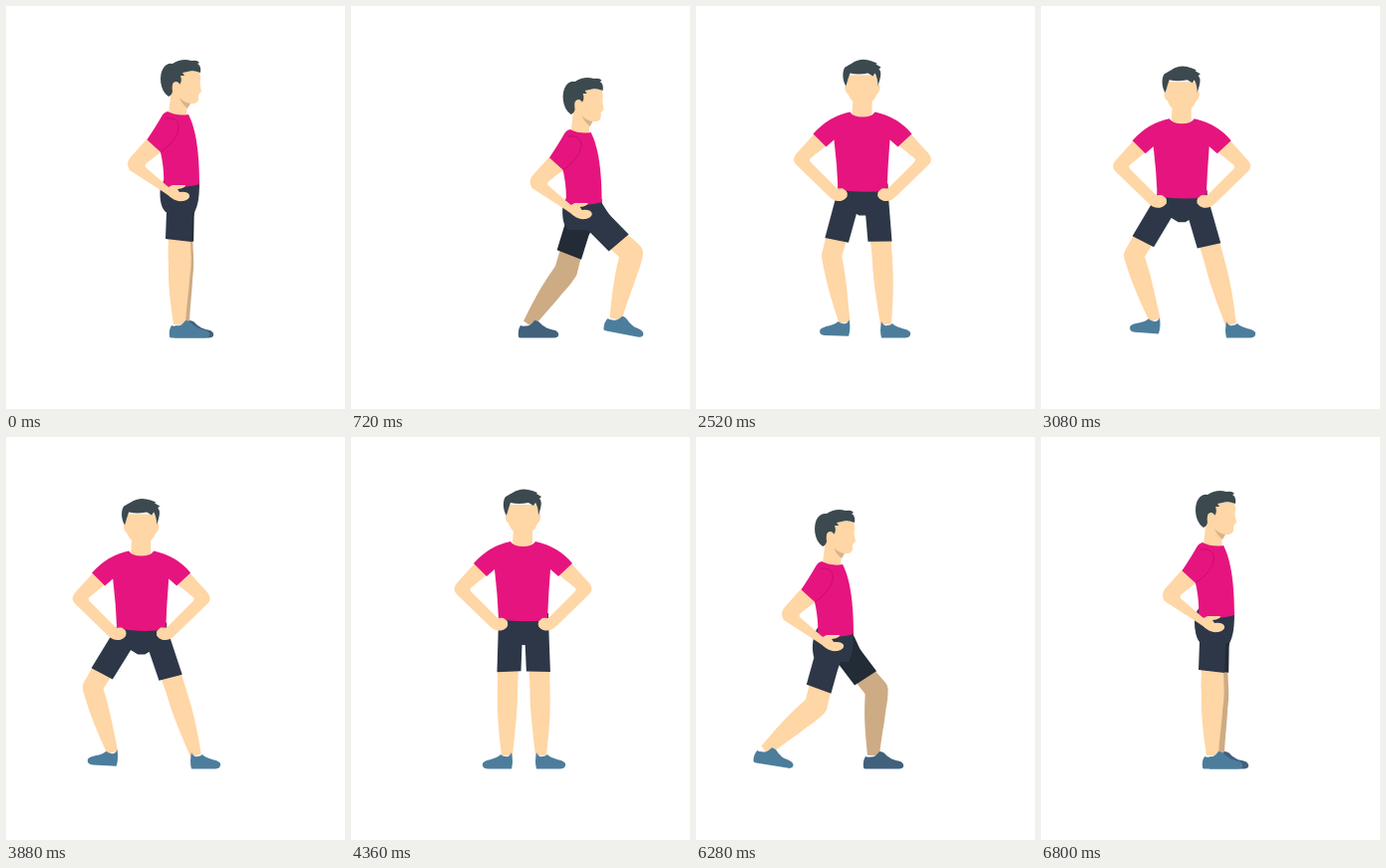
An HTML page that plays this animation: 340 px wide and 405 px high, repeating every 7.6 s.

```html
<!DOCTYPE html>
<html lang="en">
<head>
<meta charset="utf-8">
<title>Lunges</title>
<style>
  html, body { margin: 0; height: 100%; overflow: hidden; background: #fff; }
  svg { display: block; width: 100%; height: 100%; }
  svg { --skin: #ffd6a5; --shorts: #2d3748; --shoe: #4d7d9c; }
  .far { --skin: #cdab84; --shorts: #222b36; --shoe: #41617d; }
  .skin { fill: var(--skin); }
  .shorts { fill: var(--shorts); }
  .shoe { fill: var(--shoe); }
  .shirt { fill: #e6147f; }
  .hair { fill: #3c494e; }
  .shade { fill: #d9b389; }
  .seam { fill: none; stroke: #c40f6b; stroke-width: 1; }
</style>
</head>
<body>
<svg viewBox="0 0 340 405">
  <defs>
    <!-- limb parts hang down from their joint at 0,0 -->
    <g id="thigh">
      <path class="skin" d="M-11 45H11L11.5 68A11.5 11.5 0 0 1-11.5 68Z"/>
      <path class="shorts" d="M-18 0A18 18 0 0 1 18 0C18 12 14 18 13 28L12 53L-14 50L-13 22C-16 16-18 10-18 0Z"/>
    </g>
    <g id="shin">
      <path class="skin" d="M-11 0A11.3 11.3 0 0 1 11.5 0C12 10 11 14 10 24C9 38 7 50 6 68H-6C-8 52-12 32-11 0Z"/>
    </g>
    <g id="foot">
      <path class="shoe" d="M-8 1Q-11 6-10 12Q-10 13.5-7 13.5H26Q31 13 30 9C28 4 20 6 16 2C12 0 11-4 6-4Q2 2-3 1.500Q-6 2-8 1Z"/>
    </g>
    <g id="frontThigh">
      <path class="skin" d="M-11.500 45H9.500L9 68A10 10 0 0 1-11 68Z"/>
      <path class="shorts" d="M-12-6H12.500L12 51L-12 52.500Z"/>
    </g>
    <g id="frontShin">
      <path class="skin" d="M-11 0A10 10 0 0 1 9 0C10 20 8 42 6 68H-5C-8 48-11 28-11 0Z"/>
    </g>
    <g id="frontFoot">
      <path class="shoe" d="M-6-1C-10 4-22 4-24 8Q-25 13-19 13.500H5Q7 6 5-3Q3 2-1 1Q-4 1-6-1Z"/>
    </g>
    <g id="frontArm">
      <path class="skin" d="M125 126L106 147Q101 153 106 158L139 190Q145 196 152 194Q158 191 157 186Q155 181 147 182L121 156Q118 153 121 151L137 138Z"/>
    </g>
  </defs>

  <g id="side">
    <g id="farLeg" class="far"><use href="#shin"/><use href="#thigh"/><use href="#foot"/></g>
    <g id="nearLeg"><use href="#shin"/><use href="#thigh"/><use href="#foot"/></g>
    <g id="sideBody">
      <path class="shorts" d="M155 180L194 176C194 190 193 200 189 207L160 207C154 201 154 190 155 180Z"/>
      <path class="skin" d="M166 82L173 66L194 66Q196 72 194.500 78L196 86L193 89Q194 97 189 98L182 98L181 111Q171 113 163 108Z"/>
      <path class="shade" d="M174 92Q178 97 185 98L182 103Q176 98 174 92Z"/>
      <path class="hair" d="M163 91C154 85 153 69 158 62Q162 57 167 58Q176 52 186 55Q192 54 194 57L192 58Q196 60 195 67Q188 64 182 66L177 67L179 70L175 70Q177 76 174 79Q172 74 168 77Q166 80 167 86Q166 90 163 91Z"/>
      <path class="skin" d="M167 79Q170 74 174 78Q175 84 171 89Q167 87 167 79Z"/>
      <path class="shirt" d="M162 106Q172 111 183 109C191 124 194 150 194 179Q180 183 158 182C159 168 157 156 155 147L141 135Q151 120 156 111Q158 107 162 106Z"/>
      <path class="seam" d="M160 113Q173 111 173.500 122Q172 135 155 147"/>
      <path class="skin" d="M141 134L124 153Q120 159 124 165L158 187C166 192 168 197 178 196Q185 194 184 190Q182 186 174 187L172 184Q180 183 180 180L167 180L163 182L141 163Q138 161 141 158L155 147Z"/>
    </g>
  </g>

  <g id="front">
    <g id="leftLeg"><use href="#frontShin"/><use href="#frontThigh"/><use href="#frontFoot"/></g>
    <g transform="translate(346) scale(-1 1)">
      <g id="rightLeg"><use href="#frontShin"/><use href="#frontThigh"/><use href="#frontFoot"/></g>
    </g>
    <g id="frontBody">
      <path class="shorts" d="M148 177H198V196L176 209H169L148 196Z"/>
      <path class="skin" d="M163 92H182V106Q180 112 172 112Q164 112 162 106Z"/>
      <path class="skin" d="M157 68H188V78Q191 77 190 82Q189 86 187 87Q183 98 172.500 98Q162 98 158 87Q154 84 155 78L157 79Z"/>
      <path class="hair" d="M156 79C152 73 152 64 155 60Q160 57 162 56Q171 50 182 54L187 56L186 57L191 60L189 62Q192 64 190 72L188 79Q188 71 185 66L183 69L178 66Q168 68 160 66Q158 71 156 79Z"/>
      <use href="#frontArm"/>
      <use href="#frontArm" transform="translate(345) scale(-1 1)"/>
      <path class="shirt" d="M160 105Q163 110 172.500 110Q182 110 185 105Q208 110 222 127L208 140L200 133Q198 158 197 184Q172 187 148 183Q147 158 144 133L136 140L123 127Q139 109 160 105Z"/>
      <path class="skin" d="M141 187Q145 181 153 182Q158 185 157 190Q153 196 146 193Z"/>
      <path class="skin" d="M204 187Q200 181 192 182Q187 185 188 190Q192 196 199 193Z"/>
    </g>
  </g>
</svg>
<script>
const $ = id => document.getElementById(id);
const LOOP = 7600, STEP = 40, OUT = 1000, BONE = 68;
const HIP_Y = 184, ANKLE_Y = 320;

const clamp = v => Math.max(0, Math.min(1, v));
const move = (id, x, y) => $(id).setAttribute("transform", `translate(${x} ${y})`);

// Two-bone leg: the knee bends to the right (bend = 1) or to the left (-1).
function poseLeg(id, hx, hy, ax, ay, bone, bend, roll) {
  const dx = ax - hx, dy = ay - hy, dist = Math.hypot(dx, dy);
  const len = Math.max(bone, dist / 2);
  const line = Math.atan2(dx, dy), half = bend * Math.acos(dist / 2 / len);
  const upper = line + half, lower = line - half;
  const place = (el, x, y, angle, stretch) => el.setAttribute("transform",
    `translate(${x} ${y}) rotate(${angle}) scale(1 ${stretch})`);
  const deg = a => -a * 180 / Math.PI;
  const [shin, thigh, foot] = $(id).children;
  place(thigh, hx, hy, deg(upper), len / BONE);
  place(shin, hx + len * Math.sin(upper), hy + len * Math.cos(upper), deg(lower), len / BONE);
  place(foot, ax, ay, roll, 1);
}

function poseSide(p, dx, dy, x0, stride, reach) {
  const bump = Math.sin(Math.PI * p), x = dx * p, y = dy * p;
  move("sideBody", x, y);
  poseLeg("farLeg", 175 + x, HIP_Y + y, 178, ANKLE_Y, 66, 1, 0);
  poseLeg("nearLeg", x0 + x, HIP_Y + y, x0 + stride * reach, ANKLE_Y - 7 * bump,
    63 + 7 * p, 1, 14 * bump);
}

function poseFront(p) {
  const bump = Math.sin(Math.PI * p), x = -46 * p, y = 12 * p;
  move("frontBody", x, y);
  poseLeg("leftLeg", 160 + x, HIP_Y + y, 156 - 62 * p, ANKLE_Y - 5 * bump, BONE, -1, 5 * bump);
  poseLeg("rightLeg", 160 - x, HIP_Y + y, 155, ANKLE_Y, 66, -1, 0);
}

// Step out, hold, then return between the two given times.
const lunge = (t, from, to) => Math.min(clamp(t / OUT), clamp((to - t) / (to - from)));

function render(t) {
  const frontal = t >= 2400 && t < 4800;
  $("side").style.display = frontal ? "none" : "";
  $("front").style.display = frontal ? "" : "none";
  if (frontal) {
    poseFront(lunge(t - 2400, 1360, 1960));
  } else if (t < 2400) {
    const p = lunge(t, 1320, 1920);
    poseSide(p, 80, 25, 174, 127, p);
  } else {
    const p = lunge(t - 4800, 1320, 2000);
    poseSide(p, -47, 25, 172, -118, (1 - Math.cos(Math.PI * p)) / 2);
  }
}

const start = performance.now();
function tick() {
  const t = (performance.now() - start) % LOOP;
  render(Math.floor(t / STEP) * STEP);
  requestAnimationFrame(tick);
}
tick();
</script>
</body>
</html>
```
